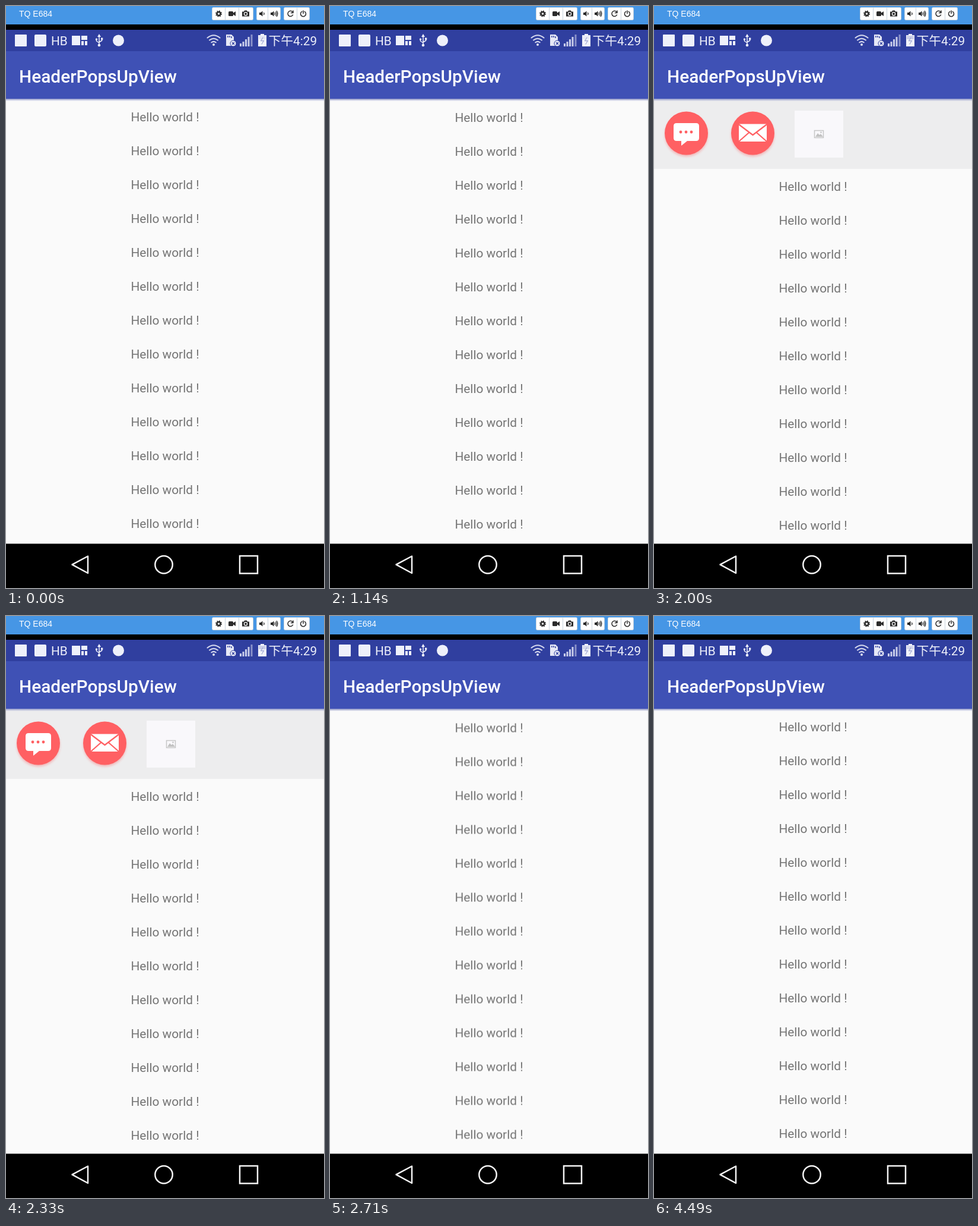
Write an HTML page that moves like this. It is 536x979 px and loops after 4.87 s.

```html
<!DOCTYPE html>
<html lang="en">
<head>
<meta charset="utf-8">
<title>HeaderPopsUpView</title>
<style>
  html, body { margin: 0; width: 100%; height: 100%; overflow: hidden; background: #000; }
  svg { display: block; width: 100vw; height: 100vh; }
  text { font-family: Roboto, "Noto Sans CJK TC", "Noto Sans CJK SC", "Noto Sans CJK", sans-serif; }
  .device { font: 14px "Liberation Sans", sans-serif; fill: #fff; }
  .title { font-size: 29.8px; font-weight: 500; fill: #fff; }
  .status { font-size: 20.8px; fill: #eef0fa; }
  .row { font-size: 20.85px; text-anchor: middle; fill: #747474; }
  .line { fill: none; stroke-linecap: round; stroke-linejoin: round; }

  .scroll { animation: reveal 4870ms step-end infinite; }
  .level { animation: charge 4870ms step-end infinite; }
  .wifi { animation: wifi 4870ms step-end infinite; }

  @keyframes reveal {
    0% { transform: translateY(0); }
    23.4% { transform: translateY(1px); }
    25.25% { transform: translateY(19px); }
    26.89% { transform: translateY(58.5px); }
    28.33% { transform: translateY(94px); }
    29.77% { transform: translateY(117px); }
    49.07% { transform: translateY(114px); }
    50.92% { transform: translateY(89.5px); }
    52.56% { transform: translateY(53px); }
    54.2% { transform: translateY(18px); }
    55.64% { transform: translateY(1.5px); }
    57.28%, 100% { transform: translateY(0); }
  }
  @keyframes charge {
    0% { opacity: .08; }
    10.67% { opacity: .2; }
    20.12% { opacity: .05; }
    41.06% { opacity: .2; }
    50.92% { opacity: .35; }
    55.64% { opacity: .15; }
    60.36% { opacity: .05; }
    71.45% { opacity: .3; }
    80.69% { opacity: .2; }
    92.19%, 100% { opacity: .15; }
  }
  @keyframes wifi {
    0%, 17.04%, 100% { opacity: .92; }
    15.4% { opacity: 1; }
  }
</style>
</head>
<body>
<svg viewBox="0 0 536 979" preserveAspectRatio="none">
  <defs>
    <clipPath id="content"><rect y="156" width="536" height="749"/></clipPath>
    <linearGradient id="shade" x2="0" y2="1">
      <stop stop-color="#4653a8" stop-opacity=".6"/>
      <stop offset="1" stop-color="#5a66b8" stop-opacity="0"/>
    </linearGradient>
    <filter id="soft" x="-20%" y="-20%" width="140%" height="140%"><feGaussianBlur stdDeviation="2"/></filter>
  </defs>

  <!-- content -->
  <rect y="156" width="536" height="749" fill="#fafafa"/>
  <g clip-path="url(#content)">
    <g class="scroll" id="scroll">
      <g transform="translate(0 -117)">
        <rect y="157" width="536" height="117" fill="#ededee"/>
        <g fill="#f58f91" opacity=".65" filter="url(#soft)">
          <circle cx="54.5" cy="217" r="36"/><circle cx="166.5" cy="217" r="36"/>
        </g>
        <g fill="#ff6063">
          <circle cx="54.5" cy="214" r="36.5"/><circle cx="166.5" cy="214" r="36.5"/>
        </g>
        <path fill="#fff" d="M38 197H71Q76 197 76 202V222Q76 227 71 227H56L46 235V227H38Q33 227 33 222V202Q33 197 38 197Z"/>
        <g fill="#ff6063"><circle cx="45" cy="212" r="2.4"/><circle cx="54" cy="212" r="2.4"/><circle cx="63" cy="212" r="2.4"/></g>
        <rect x="143" y="198.5" width="47" height="29.5" rx="1.5" fill="#fff"/>
        <path class="line" stroke="#ff6063" stroke-width="2.2" d="M144 200L166.5 217L189 200M144 227L160 213M189 227L173 213"/>
        <rect x="237" y="176" width="82" height="79" fill="#f9f8fb"/>
        <rect x="270.5" y="209.5" width="15" height="12" fill="none" stroke="#c6c6c6" stroke-width="1.5"/>
        <path fill="#c2c2c2" d="M272 220L276 214L279 217L281 215L285 220Z"/>
        <circle cx="281.5" cy="212.5" r="1.3" fill="#c2c2c2"/>
      </g>
    </g>
  </g>

  <!-- mirror toolbar -->
  <rect width="536" height="31" fill="#4696e5"/>
  <rect y="31" width="536" height="9"/>
  <text class="device" x="22" y="18">TQ E684</text>
  <g fill="#fff" stroke="#c9d3dc">
    <rect x="347.5" y="2.5" width="69" height="21" rx="2"/>
    <rect x="422.5" y="2.5" width="40" height="21" rx="2"/>
    <rect x="468.5" y="2.5" width="43" height="21" rx="2"/>
    <path d="M369.5 3V23M392.5 3V23M441.5 3V23M490.5 3V23"/>
  </g>
  <g fill="#2b2b2b">
    <circle cx="358.5" cy="13" r="3" fill="none" stroke="#2b2b2b" stroke-width="2.5"/>
    <circle cx="358.5" cy="13" r="4.7" fill="none" stroke="#2b2b2b" stroke-width="1.6" stroke-dasharray="1.85 1.84"/>
    <rect x="375" y="9" width="8" height="8" rx="1.5"/><path d="M382 12.5L387 9V17L382 13.5Z"/>
    <path d="M398 9.5H401L402 7.5H406L407 9.5H410V17.5H398Z"/>
    <circle cx="404" cy="13.3" r="2.6" fill="none" stroke="#fff" stroke-width="1.2"/>
    <path d="M427 11H429.5L432.5 8.5V17.5L429.5 15H427Z"/>
    <path d="M446 11H448.5L451.5 8.5V17.5L448.5 15H446Z"/>
  </g>
  <g class="line" stroke="#2b2b2b" stroke-width="1.2">
    <path d="M434.5 11.5Q436 13 434.5 14.5M453 11.5Q454.5 13 453 14.5M454.7 9.8Q457.5 13 454.7 16.2M456.3 8.3Q459.5 13 456.3 17.7"/>
    <path stroke-width="1.5" d="M483 10A4.5 4.5 0 1 0 483.5 15M484 8V11.5H480.5"/>
    <path stroke-width="1.5" d="M498.7 9.3A4.5 4.5 0 1 0 503.3 9.3M501 8V12.5"/>
  </g>

  <!-- status bar -->
  <rect y="40" width="536" height="36" fill="#303f9f"/>
  <g fill="#eef0fa">
    <rect x="15" y="48" width="20" height="20" rx="1"/>
    <rect x="48" y="48" width="20" height="20" rx="2"/>
    <text class="status" x="76" y="65.5">HB</text>
    <path d="M111 50H125V66H111ZM127 50H137V57H127ZM127 59H131V66H127ZM133 59H137V66H133Z"/>
    <circle cx="189.5" cy="58" r="9.5"/>
    <path d="M157 47L160 52H154Z"/>
    <circle cx="157" cy="66" r="2.3"/><circle cx="152.5" cy="56" r="1.7"/><rect x="160" y="53.5" width="3.3" height="3.3"/>
  </g>
  <path class="line" stroke="#eef0fa" stroke-width="1.5" d="M157 51V65M152.5 56V59L157 62M161.7 56V58L157 61"/>
  <g class="wifi">
    <path class="line" stroke="#e6e8f6" stroke-width="2" d="M339.5 53.5Q350 45 360.5 53.5M343 57.5Q350 52 357 57.5M346.3 61.3Q350 58.5 353.7 61.3"/>
    <circle cx="350" cy="65" r="2" fill="#eef0fa"/>
  </g>
  <path fill="#e6e8f6" d="M371 48H380L384 52V67H371Z"/>
  <path stroke="#303f9f" stroke-width="1.5" d="M374 50V53M377 50V53M380 51V54"/>
  <circle cx="383" cy="63" r="5" fill="#eef0fa" stroke="#303f9f"/>
  <path stroke="#303f9f" stroke-width="1.4" d="M381 61L385 65M385 61L381 65"/>
  <path fill="#c9cdea" d="M394 63H397V68H394ZM398.5 60H401.5V68H398.5ZM403 56H406V68H403ZM407.5 52H410.5V68H407.5Z"/>
  <path fill="#8991c9" d="M412.5 48H415.5V68H412.5Z"/>
  <path fill="#f3f4fb" d="M429 47H435V49H439V68H425V49H429Z"/>
  <path class="level" fill="#303f9f" d="M426 50H438V56H426Z"/>
  <path class="line" stroke="#a5abd6" stroke-width="1.3" d="M433 53L429.5 58.5H434.5L431 64"/>
  <text class="status" x="442.5" y="66">下午4:29</text>

  <!-- app bar -->
  <rect y="76" width="536" height="80" fill="#3f51b5"/>
  <rect y="156" width="536" height="4" fill="url(#shade)"/>
  <text class="title" x="22" y="128.5">HeaderPopsUpView</text>

  <!-- navigation bar -->
  <rect y="904.5" width="536" height="74.5"/>
  <g fill="none" stroke="#f4f4f4" stroke-width="2.5">
    <path stroke-linejoin="round" d="M138 925.5V954L111.5 939.7Z"/>
    <circle cx="266" cy="939.7" r="14.7"/>
    <rect x="394" y="925" width="30" height="29.5"/>
  </g>
</svg>
<script>
  const scroll = document.getElementById("scroll");
  for (let i = 0; i < 13; i++) {
    const row = document.createElementNS(scroll.namespaceURI, "text");
    row.setAttribute("class", "row");
    row.setAttribute("x", 268);
    row.setAttribute("y", 194 + 57 * i);
    row.textContent = "Hello world !";
    scroll.append(row);
  }
</script>
</body>
</html>
```
